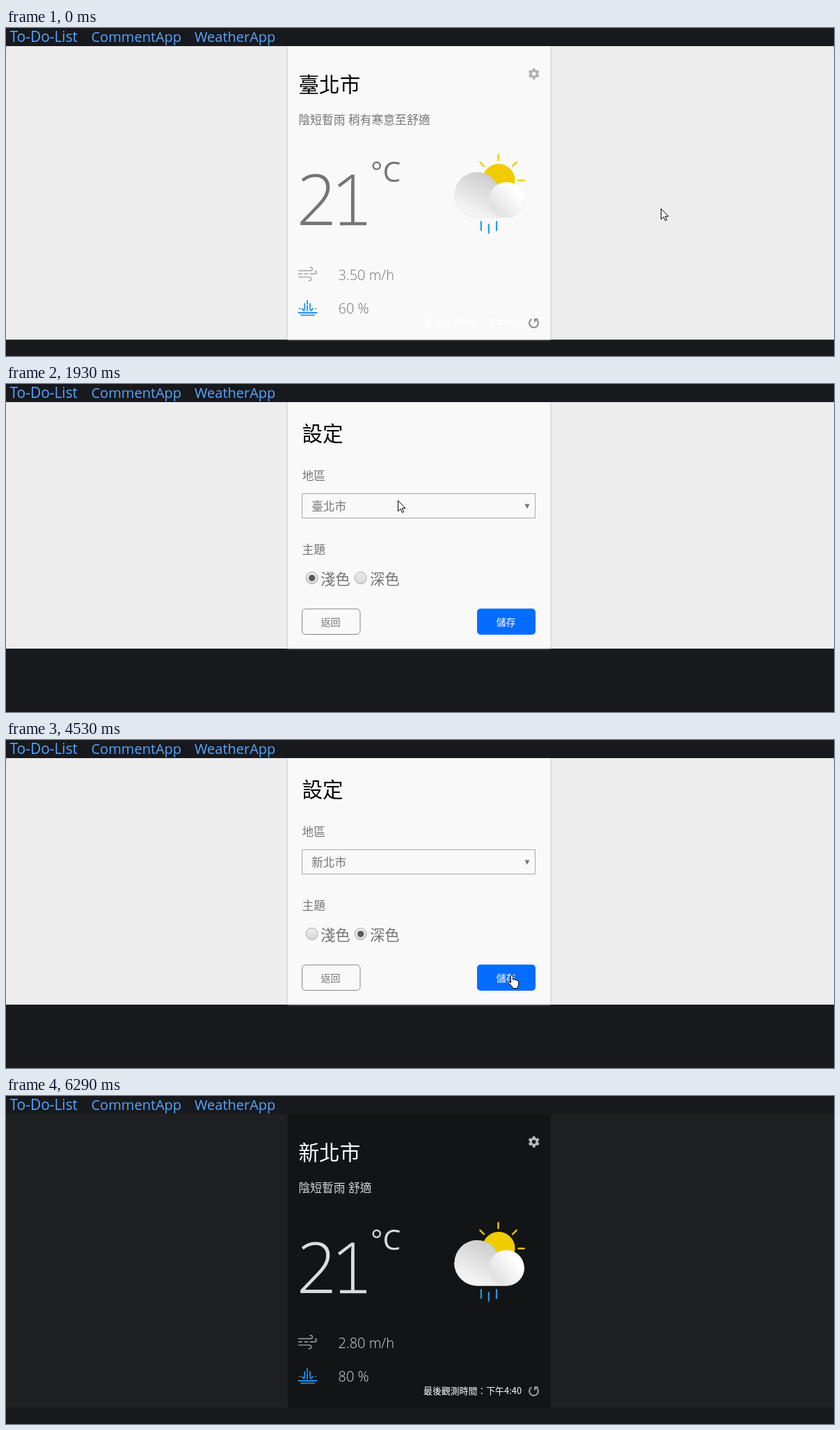
Recreate the animation shown at these times as an HTML page. Size 1190 by 471 pixels, loop 6.75 s.

```html
<!DOCTYPE html>
<html lang="zh-Hant">
<head>
<meta charset="utf-8">
<title>WeatherApp</title>
<style>
html, body { margin: 0; height: 100%; overflow: hidden; background: #17191d; }
svg {
  display: block; width: 1190px; height: 471px;
  --page: #ededed; --card: #f9f9f9; --shadow: #b0b0b0;
  --title: #000; --text: #757575; --big: #757575; --icon: #b0b0b0;
}
svg.dark {
  --page: #1f2022; --card: #121416; --shadow: #17181a;
  --title: #fff; --text: #d6d6d6; --big: #dcdcdc; --icon: #bcbcbc;
}
text {
  font: 300 16.8px "Open Sans", "Noto Sans CJK TC", "Noto Sans CJK", sans-serif;
  fill: var(--text); white-space: pre;
}
#nav text { font-size: 20px; font-weight: 400; fill: #58a6ff; }
#nav text:first-child { font-size: 20.9px; }
#page { fill: var(--page); }
#card { fill: var(--card); filter: drop-shadow(0 0 1.5px var(--shadow)); }
text.title { font-size: 29.6px; font-weight: 100; fill: var(--title); }
text.temp { font-size: 101.5px; fill: var(--big); }
text.unit { font-size: 41px; font-weight: 500; fill: var(--big); }
text.data { font-size: 20px; }
text.seen { font: 400 12.9px "Noto Sans CJK TC", "Noto Sans CJK", sans-serif; fill: #fff; }
text.radio { font-size: 21.3px; }
text.button { font-size: 14px; }
text.white { fill: #fff; }
.line { fill: none; stroke-linecap: round; }
.yellow { fill: #efcc00; stroke: #efcc00; }
</style>
</head>
<body>
<svg id="stage" viewBox="0 0 1190 471">
  <defs>
    <linearGradient id="back" x1=".7" y1=".1" x2=".3" y2=".85">
      <stop stop-color="#cdcdcd"/><stop offset="1" stop-color="#f3f3f3"/>
    </linearGradient>
    <linearGradient id="front" x1=".75" y1=".25" x2=".1" y2=".75">
      <stop stop-color="#fff"/><stop offset="1" stop-color="#e0e0e0"/>
    </linearGradient>
    <linearGradient id="knob" x2="0" y2="1">
      <stop stop-color="#eee"/><stop offset="1" stop-color="#d6d6d6"/>
    </linearGradient>
  </defs>

  <rect id="page" y="26" width="1190"/>
  <rect id="card" x="405" y="26" width="377.5"/>
  <rect width="1190" height="26" fill="#17191d"/>
  <g id="nav">
    <text x="5.5" y="20">To-Do-List</text>
    <text x="122.5" y="20">CommentApp</text>
    <text x="271" y="20">WeatherApp</text>
  </g>

  <g id="weather">
    <text class="title" id="city" x="420.5" y="92"></text>
    <text id="sky" x="420.5" y="137.5"></text>
    <text class="temp" x="417.5" y="283">2<tspan x="467">1</tspan></text>
    <path d="M480 281h38" stroke="var(--big)" stroke-width="4.6"/>
    <text class="unit" x="524" y="221">°C</text>
    <text class="data" id="wind" x="477.5" y="362"></text>
    <text class="data" id="rain" x="477.5" y="410"></text>
    <text class="seen" x="600" y="427.5">最後觀測時間：下午4:40</text>

    <g class="line" stroke="var(--icon)">
      <circle cx="758.7" cy="65.8" r="4.5" stroke-width="3.4"/>
      <circle cx="758.7" cy="65.8" r="6.6" stroke-width="3" stroke-linecap="butt"
        pathLength="24" stroke-dasharray="2 2" stroke-dashoffset="-1"/>
    </g>
    <path class="line" d="M754.7 418.6a6.4 6.4 0 1 0 8.3.6" stroke="#929292" stroke-width="2.3"/>
    <path d="M765.5 417H759v6.5z" fill="#929292"/>
    <path class="line" stroke="#a4a4a4" stroke-width="1.4" d="M420.5 348.5H438a2.4 2.4 0 0 0 0-4.8h-1
      M420.5 353h5M429 353h5M437 353h7a2.2 2.2 0 0 0 0-4.4M420.5 357.6H436a2.6 2.6 0 0 1 0 5.3h-1"/>
    <path class="line" stroke="#1e90ee" stroke-width="1.8" d="M420.5 409h26M424 412.4h19M433 391.5v5M433 399v7
      M429.3 396v8M437 396v8M425.5 403l3 3M441 403l-3 3M421.8 403h.2M445 403h.2"/>

    <g id="sun" class="yellow"><circle cx="694" cy="238" r="35"/></g>
    <g id="cloud">
      <g id="halo" class="yellow"><circle cx="708" cy="218.5" r="23"/></g>
      <path d="M677 272.3a32.6 32.6 0 1 1 32.6-32.6l10 32.6z" fill="url(#back)"/>
      <circle cx="719.3" cy="246.8" r="25.5" fill="url(#front)"/>
      <path d="M677 272.3a32.6 32.6 0 0 1-32.6-32.6M677 272.3h42.3a25.5 25.5 0 0 0 25.5-25.5"
        class="line" stroke="#e6e6e6" stroke-width=".8"/>
      <path class="line" d="M682.8 278v12.5M693.8 282v12.5M705 278v12.5" stroke="#1e9bea" stroke-width="2.2"/>
    </g>
  </g>

  <g id="settings">
    <text class="title" x="425.5" y="82">設定</text>
    <text x="425.5" y="137.5">地區</text>
    <rect x="425.5" y="157.5" width="335" height="35" fill="none" stroke="#a9a9a9"/>
    <text id="picked" x="439" y="182"></text>
    <path d="M745.5 172.5h7l-3.5 6.5z" fill="#757575"/>
    <text x="425.5" y="243.5">主題</text>
    <g fill="url(#knob)" stroke="#a8a8a8">
      <circle cx="439.7" cy="278.5" r="8.5"/>
      <circle cx="509.7" cy="278.5" r="8.5"/>
    </g>
    <circle id="dot" cy="278.5" r="4.5" fill="#595959"/>
    <text class="radio" x="452" y="287.5">淺色</text>
    <text class="radio" x="523" y="287.5">深色</text>
    <rect x="425.5" y="323" width="83.5" height="36.5" rx="5" fill="none" stroke="#858585"/>
    <text class="button" x="452.5" y="346.8">返回</text>
    <rect x="677" y="322.5" width="84" height="37.5" rx="5" fill="#046dff"/>
    <text class="button white" x="704.5" y="346.8">儲存</text>
  </g>

  <g id="list">
    <path d="M425 192h356v280h-356z" fill="#ededed"/>
    <rect id="mark" x="426" width="334" height="21.5" fill="#1e90ff"/>
    <path d="M761 193h18v280h-18z" fill="#f1f1f1"/>
    <path d="M762 213h15.5v207.5H762z" fill="#c1c1c1"/>
    <path d="M765.5 207.5h8l-4-4.5z" fill="#a3a3a3"/>
    <path d="M425.5 193v280M780.3 193v280" stroke="#5c93d6" stroke-width="1.2"/>
    <path d="M425 192.5h356" stroke="#101010" stroke-width="1.2"/>
  </g>

  <g id="pointer" fill="#fff" stroke="#000" stroke-linejoin="round">
    <path id="arrow" d="M.5.5v15.2l3.6-3.4 2.4 5.3 2.2-1-2.4-5.2h4.6z"/>
    <path id="hand" d="M.5 12V1.8a1.5 1.5 0 0 1 3 0V7q2.6-1.2 3 .6 2.4-.8 2.8.8 2.4-.4 2.4 1.8V14
      q0 2-1.4 3.4V19.5H2.8V17.5L-3 11.5q0-2.4 2-1.4z"/>
  </g>
</svg>
<script>
const LOOP = 6750, ROW = 21.5, LIST_TOP = 193.5;
const $ = id => document.getElementById(id);
const SVG = "http://www.w3.org/2000/svg";
const cities = "臺北市 新北市 宜蘭縣 桃園市 嘉義市 屏東縣 雲林縣 臺東縣 金門縣 彰化縣 高雄市 基隆市 臺南市".split(" ");

// start, end, steps, x, y
const moves = [
  [70, 730, 10, 742, 79],
  [810, 960, 3, 765, 68],
  [1680, 1930, 4, 563, 167],
  [2610, 2920, 5, 548, 234],
  [3070, 3150, 2, 543, 234],
  [3450, 3680, 4, 510, 278],
  [3910, 4530, 10, 725, 337],
  [4990, 5220, 4, 766, 340],
  [5600, 6220, 9, 1161, 467]
];

function add(parent, tag, attrs) {
  const node = document.createElementNS(SVG, tag);
  for (const key in attrs) node.setAttribute(key, attrs[key]);
  return parent.appendChild(node);
}

function addRays(id, cx, cy, inner, outer, angles) {
  for (const deg of angles) {
    const c = Math.cos(deg * Math.PI / 180), s = Math.sin(deg * Math.PI / 180);
    add($(id), "line", {
      x1: cx + c * inner, y1: cy + s * inner, x2: cx + c * outer, y2: cy + s * outer,
      "stroke-width": 2.4, "stroke-linecap": "round"
    });
  }
}
addRays("sun", 694, 238, 44, 56.8, [0, 45, 90, 135, 180, 225, 270, 315]);
addRays("halo", 707.5, 219, 29, 37, [-135, -90, -45, 0]);

const rows = cities.map((name, i) => {
  const row = add($("list"), "text", { x: 439, y: LIST_TOP + 16.7 + i * ROW });
  row.textContent = name;
  return row;
});

function pointerAt(t) {
  let x = 941, y = 259;
  for (const [start, end, n, tx, ty] of moves) {
    if (t < start) break;
    const step = Math.floor((t - start + 8) / (end - start) * (n - 1)) + 1;
    const p = Math.min(1, step / n);
    const e = n > 5 ? (1 - Math.cos(Math.PI * p)) / 2 : Math.sin(Math.PI / 2 * p);
    x += (tx - x) * e;
    y += (ty - y) * e;
  }
  return [Math.round(x), Math.round(y)];
}

const show = (id, on) => $(id).style.display = on ? "" : "none";
const write = (id, value) => { if ($(id).textContent !== value) $(id).textContent = value; };

function draw(t) {
  const dark = t >= 4760, loaded = t >= 4840;
  const settings = t >= 1510 && !dark;
  const open = t >= 2310 && t < 3300;
  const [x, y] = pointerAt(t);

  $("stage").classList.toggle("dark", dark);
  for (const id of ["page", "card"]) $(id).setAttribute("height", settings ? 354 : 421.5);
  show("weather", !settings);
  show("settings", settings);
  show("list", open);

  write("city", cities[+dark]);
  write("sky", loaded ? "陰短暫雨 舒適" : "陰短暫雨 稍有寒意至舒適");
  write("wind", loaded ? "2.80 m/h" : "3.50 m/h");
  write("rain", loaded ? "80 %" : "60 %");
  show("sun", dark && !loaded);
  show("cloud", !dark || loaded);

  write("picked", cities[t < 3300 ? 0 : 1]);
  $("dot").setAttribute("cx", t < 3910 ? 439.7 : 509.7);
  const hover = Math.max(0, Math.floor((y - LIST_TOP) / ROW));
  $("mark").setAttribute("y", LIST_TOP + hover * ROW);
  rows.forEach((row, i) => row.classList.toggle("white", i === hover));

  const onSave = settings && x >= 677 && y >= 323;
  show("arrow", !onSave);
  show("hand", onSave);
  show("pointer", t < 6290);
  $("pointer").setAttribute("transform", `translate(${x} ${y})`);
}

function tick() {
  draw(performance.now() % LOOP);
  requestAnimationFrame(tick);
}
tick();
</script>
</body>
</html>
```
